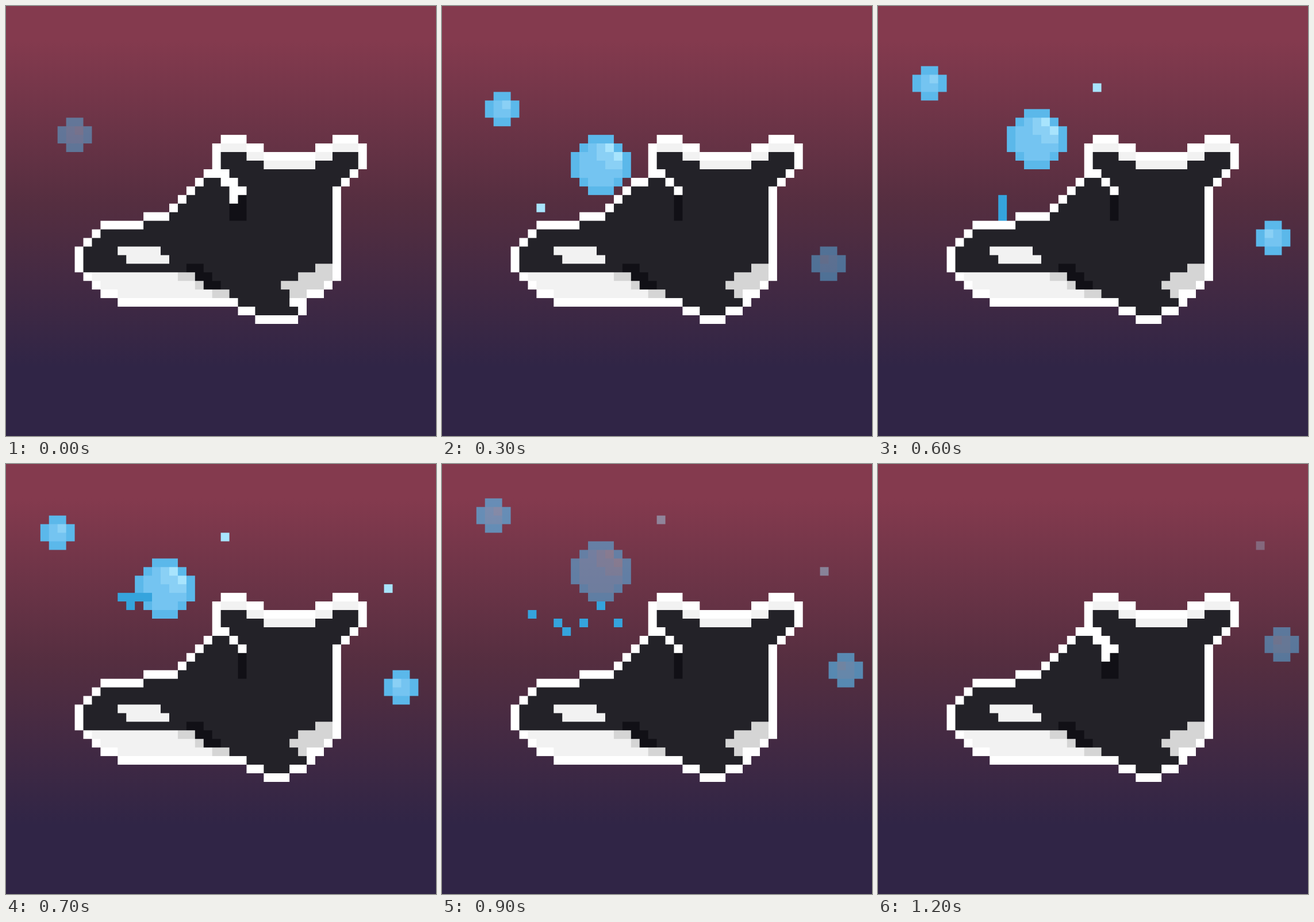
Animation of 748 by 748 pixels, one loop 1300 ms. Source, as an HTML page with a canvas:

```html
<!DOCTYPE html>
<html lang="en">
<head>
<meta charset="utf-8">
<title>Orca</title>
<style>
html, body { margin: 0; width: 100%; height: 100%; overflow: hidden; }
body { background: #302546; }
canvas { display: block; width: 748px; height: 748px; }
</style>
</head>
<body>
<canvas id="stage" width="748" height="748"></canvas>
<script>
const GRID = 50, ZOOM = 16, SIZE = 747.25, STEP = 100, STEPS = 13;
const INK = '#232228', DARK = '#111016', LIGHT = '#f2f2f2', GREY = '#d5d5d5', WHITE = '#fff';
const WATER = '#35a4dd';
const SHADES = ['#5bb8ea', '#74c4f1', '#8ad0f5', '#a8e4fd'];

function layer(size) {
  const canvas = document.createElement('canvas');
  canvas.width = canvas.height = size;
  return canvas.getContext('2d');
}
const ctx = document.getElementById('stage').getContext('2d');
const pix = layer(GRID);
const big = layer(GRID * ZOOM);
big.imageSmoothingEnabled = false;
ctx.imageSmoothingQuality = 'high';

const sky = ctx.createLinearGradient(0, 0, 0, 748);
sky.addColorStop(.08, '#843a4e');
sky.addColorStop(.46, '#552e40');
sky.addColorStop(.84, '#302546');

function box(color, x, y, w = 1, h = 1) {
  pix.fillStyle = color;
  pix.fillRect(x, y, w, h);
}

// Returns a test for cells whose centre lies in the path.
function area(d) {
  const path = new Path2D(d);
  return (x, y) => pix.isPointInPath(path, x + .5, y + .5);
}

function eachCell(visit) {
  for (let y = 0; y < GRID; y++) for (let x = 0; x < GRID; x++) visit(x, y);
}

// Fades out towards step 10; whatever outlives it brightens again slowly.
const fade = (n, power) => Math.min(1, Math.max((11 - n) / 3, (n - 6.7) / 10)) ** power;

function bubble(size, left, top, alpha, side = 1) {
  const mid = (size - 1) / 2;
  for (let j = 0; j < size; j++) for (let i = 0; i < size; i++) {
    const dx = (i - mid) * side, dy = j - mid;
    const dist = Math.hypot(dx, dy), glint = dx - dy;
    if (dist > size / 2 - .1) continue;
    let shade = dist > size / 2 - .9 ? 0 : 1;
    if (shade && dx >= 0 && dy <= 0 && glint >= 1) shade = glint >= 3 ? 3 : 2;
    pix.globalAlpha = alpha < 1 ? alpha * (1 - shade / 10) : 1;
    box(SHADES[shade], left + i, top + j);
  }
  pix.globalAlpha = 1;
}

function spark(x, y, alpha = 1) {
  pix.globalAlpha = alpha;
  box(SHADES[3], x, y);
  pix.globalAlpha = 1;
}

function drawBubbles(n) {
  const shown = (birth, power) => n === birth ? .5 : fade(n, power);
  const sway = Math.ceil(n / 4);
  if (n <= 10) bubble(4, 6 - Math.min(sway, 2), Math.max(4, 13 - n), shown(0, 1));
  if (n >= 1 && n <= 10) bubble(7, 15, 18 - n, shown(1, 1.4));
  if (n >= 3) bubble(4, 42 + sway, 31 - n, shown(3, 1), -1);
  if (n >= 1 && n <= 4) spark(11, Math.round(24 - n / 2));
  if (n >= 5 && n <= 10) spark(25, 15 - n, fade(n, 2));
  if (n >= 7) spark(44, 21 - n, fade(n, 2));
}

function drawOrca(n) {
  const raised = n < 3 || n > 10 ? 1 : 0;
  const low = n < 2 ? 1 : 0;
  const slope = n > 3 && n < 10 ? 19.5 : 18.5;
  const keel = low ? 'V34H32.5L34 35V36H29.5L26 34' : 'V34.6L33 35.4V36H30.5L27 34';
  const body = area(`M25 16H27L31 18H35L39 16H41V19H40.5L38 21.5V32L35 33.5${keel}
    H13.5L10 32L9 30.8V28H9.5L11.5 26H16V25H${slope}l4 -4L${raised ? 23.5 : 24.6} 20H26V19H25z`);

  eachCell((x, y) => {
    if (body(x, y)) {
      const flukeRim = y < 19 && !body(x, y - 1);
      box(flukeRim ? LIGHT : INK, x, y);
    } else if (body(x - 1, y) || body(x + 1, y) || body(x, y - 1) || body(x, y + 1)) {
      box(WHITE, x, y);
    }
  });

  const crease = 27 - raised;
  const marks = [
    [GREY, 'M9 31H21L26.5 34H9z'],
    [LIGHT, 'M9 31H19L25 34H9z'],
    [DARK, 'M20.5 30h2l3 3h-2z'],
    [LIGHT, 'M12.5 28h5l2 2h-5z'],
    [GREY, `M38 30H37L34 31.6L${33 - low} 32V33h1V34H38z`],
    [DARK, `M${crease} 22H28V25H${crease}z`],
    [WHITE, `M${crease - 1.5} 20H26.5L28.5 22H27V23H${crease}V21.5z`]
  ];
  for (const [color, d] of marks) {
    const mark = area(d);
    eachCell((x, y) => { if (mark(x, y) && body(x, y)) box(color, x, y); });
  }
}

// Drops as [sideways speed, launch speed], falling until they land.
const DROPS = [[-1.5, 10.25], [-.5, 9.9], [0, 9.4], [.5, 9.9], [1.25, 10.4], [2, 9.9]];

function drawSpout(n) {
  const t = n - 6;
  if (t < 0) return;
  if (t === 0) return box(WATER, 14, 22, 1, 3);
  for (const [vx, vy] of DROPS) {
    const y = Math.floor(23 - vy * t + 2.75 * t * t);
    if (y <= 26) box(WATER, Math.round(14 + vx * t), y);
  }
}

function render(n) {
  pix.clearRect(0, 0, GRID, GRID);
  drawBubbles(n);
  drawOrca(n);
  drawSpout(n);
  big.clearRect(0, 0, GRID * ZOOM, GRID * ZOOM);
  big.drawImage(pix.canvas, 0, 0, GRID * ZOOM, GRID * ZOOM);
  ctx.fillStyle = sky;
  ctx.fillRect(0, 0, 748, 748);
  ctx.drawImage(big.canvas, 0, 0, SIZE, SIZE);
}

let shownStep = -1;
function tick() {
  const n = Math.floor(performance.now() / STEP) % STEPS;
  if (n !== shownStep) render(shownStep = n);
  requestAnimationFrame(tick);
}
tick();
</script>
</body>
</html>
```
